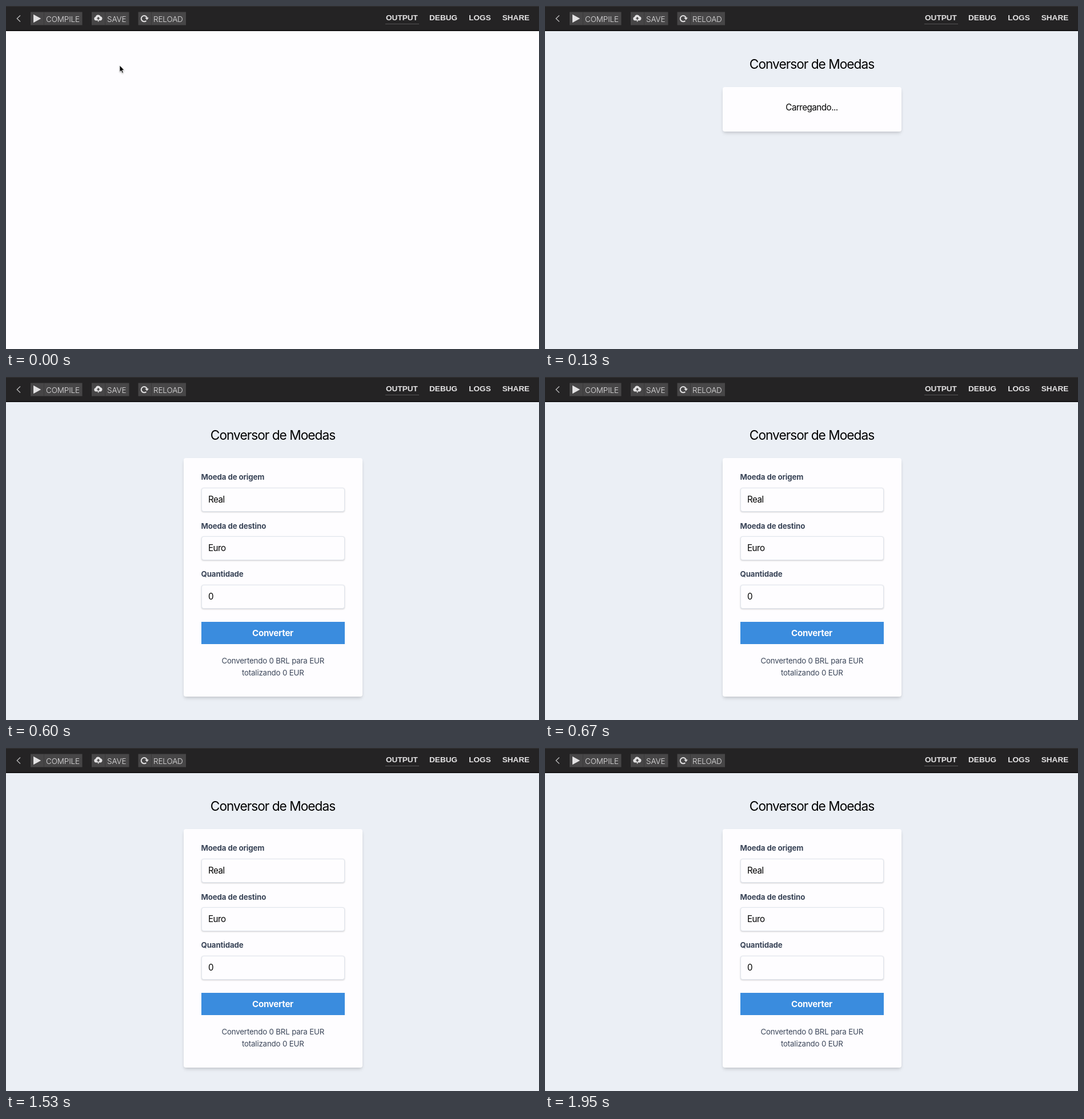
An HTML page that plays this animation: 933x601 px, repeating every 2190 ms.

```html
<!DOCTYPE html>
<html lang="pt">
<head>
<meta charset="utf-8">
<title>Conversor de Moedas</title>
<style>
html, body { margin: 0; width: 100%; height: 100%; overflow: hidden; background: #fefdff; }
#page { position: absolute; inset: 44px 0 0; background: #ebeff5; }
#card, .field { position: absolute; box-sizing: border-box; background: #fefdff; border-radius: 4px; }
#card {
  left: 310.5px; top: 98px; width: 313.5px;
  box-shadow: 0 4px 6px -1px rgba(0,0,0,.12), 0 2px 4px -1px rgba(0,0,0,.08);
}
.field {
  left: 31px; width: 251.5px; height: 42px; border: 1px solid #dfe4ec;
  box-shadow: 0 1px 3px rgba(0,0,0,.12), 0 1px 2px rgba(0,0,0,.07);
}
svg { position: absolute; left: 0; top: 0; }
text { font: 400 15.2px Inter, sans-serif; font-optical-sizing: none; letter-spacing: -.035em; }
.mid { text-anchor: middle; }
.title { font-size: 22.7px; letter-spacing: -.044em; }
.label { font-size: 13.3px; font-weight: 700; letter-spacing: -.01em; fill: #3a4558; }
.result { font-size: 13.3px; letter-spacing: -.013em; fill: #3a4558; }
.action { font-weight: 700; letter-spacing: -.02em; fill: #fefdff; }
.tool text { font-size: 13.5px; font-weight: 300; letter-spacing: -.01em; fill: #e2e1e2; }
.tool rect { fill: #474647; }
.tab { font: 700 13.6px "Liberation Sans", Arial, sans-serif; letter-spacing: 0; fill: #e4e3e4; }
</style>
</head>
<body>
<div id="page">
  <div id="card">
    <div class="field form" style="top:51.5px"></div>
    <div class="field form" style="top:136.5px"></div>
    <div class="field form" style="top:221.5px"></div>
  </div>
</div>
<svg width="933" height="601">
  <rect width="933" height="44" fill="#242324"/>
  <rect width="933" height="1" fill="#343334"/>
  <rect y="42" width="933" height="2" fill="#131213"/>
  <path d="M25 16.5L19.3 22L25 27.5" fill="none" stroke="#b5b4b5" stroke-width="1.4"/>

  <g class="tool">
    <rect x="43" y="10.5" width="90.5" height="23"/>
    <path d="M66.5 11V33" stroke="#3a393a"/>
    <path d="M48 14.8L61.3 22L48 29.3Z" fill="#e2e1e2"/>
    <text x="70" y="27.5">COMPILE</text>
  </g>
  <g class="tool">
    <rect x="150" y="10.5" width="65.5" height="23"/>
    <path d="M173.500 11V33" stroke="#3a393a"/>
    <path d="M157.500 25.500A3.300 3.300 0 0 1 156.800 19A4.700 4.700 0 0 1 165.600 18.300A3.700 3.700 0 0 1 165.700 25.500Z" fill="#e2e1e2"/>
    <path d="M161.600 19L158.600 22.300H160.700V25.500H162.500V22.300H164.600Z" fill="#474647"/>
    <path d="M161.600 24V27.500" stroke="#e2e1e2" stroke-width="1.600"/>
    <text x="177" y="27.5">SAVE</text>
  </g>
  <g class="tool">
    <rect x="231.5" y="10.5" width="83.500" height="23"/>
    <path d="M254.500 11V33" stroke="#3a393a"/>
    <path d="M245.400 26A5.200 5.200 0 1 1 247 21" fill="none" stroke="#e2e1e2" stroke-width="2"/>
    <path d="M243.300 20.500H250L246.700 24.500Z" fill="#e2e1e2"/>
    <text x="258" y="27.5">RELOAD</text>
  </g>

  <text class="tab" x="665" y="24.5">OUTPUT</text>
  <text class="tab" x="741" y="25">DEBUG</text>
  <text class="tab" x="810.2" y="25">LOGS</text>
  <text class="tab" x="868.700" y="25">SHARE</text>
  <path d="M664 31.500H723" stroke="#555455"/>

  <text class="title mid page" x="467" y="110">Conversor de Moedas</text>
  <text class="mid loading" x="467" y="182.700">Carregando...</text>

  <g class="form">
    <text class="label" x="341.500" y="180">Moeda de origem</text>
    <text x="354" y="219.500">Real</text>
    <text class="label" x="341.500" y="265.500">Moeda de destino</text>
    <text x="354" y="305">Euro</text>
    <text class="label" x="341.500" y="350">Quantidade</text>
    <text x="354" y="389.500">0</text>
    <rect x="342" y="429" width="251" height="39" fill="#3a8cde"/>
    <text class="action mid" x="467" y="454">Converter</text>
    <text class="result mid" x="467.300" y="502.300">Convertendo 0 BRL para EUR</text>
    <text class="result mid" x="467.300" y="522.700">totalizando 0 EUR</text>
  </g>

  <path id="cursor" d="M0 0V11.500L2.600 9.200L4.500 13.500L6.400 12.700L4.600 8.500H8Z"
    stroke="#fff" stroke-width=".8" style="filter:drop-shadow(0 1px 1px rgba(0,0,0,.3))"/>
</svg>
<script>
const LOOP = 2190, MOVE = 70, LOAD = 130, READY = 600;
const card = document.getElementById('card');
const cursor = document.getElementById('cursor');

function show(selector, on) {
  for (const el of document.querySelectorAll(selector)) el.style.display = on ? '' : 'none';
}

function draw(t) {
  show('#page, .page', t >= LOAD);
  show('.loading', t >= LOAD && t < READY);
  show('.form', t >= READY);
  show('#cursor', t < LOAD);
  card.style.height = (t < READY ? 78 : 417.5) + 'px';
  cursor.setAttribute('transform', t < MOVE ? 'translate(199 104)' : 'translate(281 58.5)');
}

let start;
function tick(now) {
  start ??= now;
  draw((now - start) % LOOP);
  requestAnimationFrame(tick);
}
draw(0);
requestAnimationFrame(tick);
</script>
</body>
</html>
```
